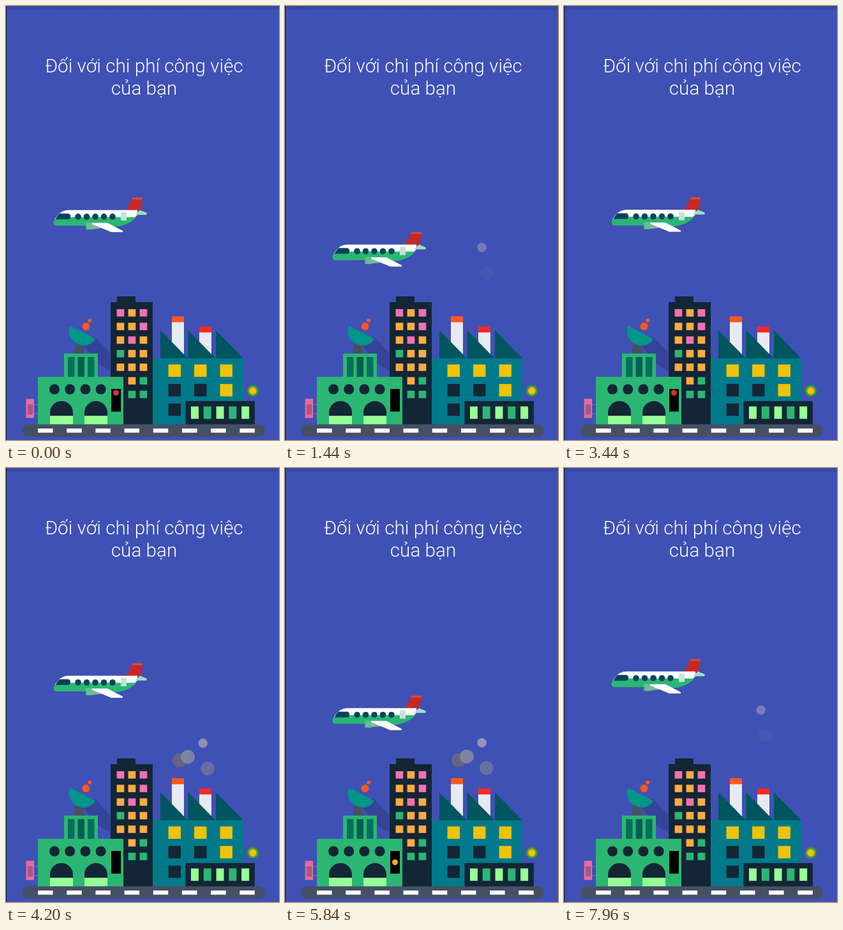
Recreate the animation shown at these times as an HTML page with a canvas. Size 428x680 px, loop 8 s.

```html
<!DOCTYPE html>
<html lang="vi">
<head>
<meta charset="utf-8">
<style>
html, body { margin: 0; width: 100%; height: 100%; overflow: hidden; background: #3f51b5; }
#stage { position: relative; width: 428px; height: 680px; overflow: hidden; }
canvas { position: absolute; left: 0; top: 0; display: block; }
h1 {
  position: absolute; left: 0; top: 76px; width: 433px; margin: 0;
  font: 300 29.7px/35px Roboto, sans-serif; color: #fff; text-align: center; white-space: nowrap;
}
</style>
</head>
<body>
<div id="stage">
  <canvas id="view" width="428" height="680"></canvas>
  <h1>Đối với chi phí công việc<br>của bạn</h1>
</div>
<script>
const LOOP = 8000, BOB = 4000, PUFF = 1632, SIGNAL = 3264;
const ctx = document.getElementById('view').getContext('2d');
const NAVY = '#132636', GREEN = '#2bb673', LIME = '#96ff96', PINK = '#f272b0',
      AMBER = '#ffab40', YELLOW = '#eec308', TEAL = '#007a8a', DEEP = '#00565f',
      ORANGE = '#ff5722', INK = '#00455c', ASPHALT = '#455064';

function rect(color, x, y, w, h) {
  ctx.fillStyle = color;
  ctx.fillRect(x, y, w, h);
}
function disc(color, x, y, r, alpha = 1) {
  if (alpha <= 0) return;
  ctx.globalAlpha = alpha;
  ctx.fillStyle = color;
  ctx.beginPath();
  ctx.arc(x, y, r, 0, Math.PI * 2);
  ctx.fill();
  ctx.globalAlpha = 1;
}
function shape(color, d) {
  ctx.fillStyle = color;
  ctx.fill(new Path2D(d));
}
function repeat(n, fn) {
  for (let i = 0; i < n; i++) fn(i);
}
// Fades in over a..b and out over c..d
function fade(t, a, b, c, d) {
  return Math.max(0, Math.min(1, (t - a) / (b - a), (d - t) / (d - c)));
}

function backdrop() {
  rect('#3f51b5', 0, 0, 428, 680);
  const g = ctx.createLinearGradient(0, 0, 0, 7);
  g.addColorStop(0, '#38479f');
  g.addColorStop(.6, '#3a4aa6');
  g.addColorStop(1, '#3f51b5');
  rect(g, 0, 0, 428, 7);
  rect('#0c1022', 0, 0, 1, 680);
}

function tower() {
  rect(NAVY, 174, 455, 29, 10);
  rect(NAVY, 164, 464, 66, 192);
  const tint = { p: PINK, o: AMBER, g: GREEN, '-': NAVY };
  ['pop', 'oop', 'opo', 'goo', 'ooo', '-og', '-gg'].forEach((row, r) =>
    repeat(3, i => rect(tint[row[i]], 173.6 + i * 18, 475 + r * 21.3, 11.7, 11.6)));
}

function factory() {
  repeat(2, i => {
    const x = 260 + i * 43, y = 486 + i * 16;
    rect('#e8eaf1', x, y, 19, 552 - y);
    rect(i ? '#f42a26' : ORANGE, x, y, 19, 9.5);
  });
  repeat(3, i => shape(DEEP, `M${242 + i * 43.5} 508l43 44h-43z`));
  rect(TEAL, 230, 552, 142, 104);
  repeat(3, r => repeat(r < 2 ? 3 : 1, c =>
    rect(r === 0 || c === 2 ? YELLOW : NAVY, 254.6 + c * 40.5, 561.6 + r * 30.6, 19.4, 19.4)));
  rect(NAVY, 281.5, 619, 108.5, 37);
  repeat(5, i => rect(i % 2 ? GREEN : LIME, 290 + i * 19.8, 627.4, 12, 19.4));
  rect(TEAL, 372, 602, 8, 2);
  disc('#1c8062', 387, 603, 10);
  disc('#5b983e', 387, 603, 8.3);
  disc(YELLOW, 387, 603, 5.7);
}

function dish() {
  shape('#354399', 'M138 517L163 543V571L144 560L122 533Z');
  shape(ASPHALT, 'M109 528H121L123 545H106Z');
  ctx.fillStyle = '#009688';
  ctx.beginPath();
  ctx.ellipse(120.3, 511.3, 22.3, 20, .48, 0, Math.PI);
  ctx.fill();
  disc(ORANGE, 125.5, 502, 6);
  disc(ORANGE, 131.3, 492.7, 3);
}

function hall() {
  rect(GREEN, 91, 544.5, 53, 38);
  repeat(3, i => rect(i === 1 ? '#025f52' : '#00705c', 97 + i * 15.5, 550, 10.5, 31.5));
  rect(GREEN, 50, 581, 134, 75);
  repeat(4, i => disc(NAVY, 76 + i * 24.2, 600.5, 8));
  repeat(2, i => {
    const x = 69 + i * 54;
    shape(NAVY, `M${x} 642v-5a18 18 0 0 1 36 0v5z`);
    rect(LIME, x, 642, 36, 13.5);
  });
  repeat(2, i => rect('#a3589c', 44, 624 + i * 14, 6, 1.2));
  rect('#e56c9e', 31.5, 615.5, 12.5, 30);
  rect('#a95685', 34, 624, 8, 16);
}

function road() {
  ctx.fillStyle = ASPHALT;
  ctx.beginPath();
  ctx.roundRect(25.5, 655.5, 380.5, 19.5, 9.7);
  ctx.fill();
  repeat(8, i => rect('#fff', 50 + i * 45.2, 662, 23.5, 6.5));
}

function signal(t) {
  rect('#000', 165, 600, 15, 35.5);
  const p = t % SIGNAL;
  // The red phase runs across the end of the cycle
  const q = p < 1000 ? p + SIGNAL : p;
  disc('#d32f2f', 172.5, 606, 4.5, fade(q, 2710, 3050, 3844, 4084));
  disc('#ffa733', 172.5, 617.8, 4.5, fade(p, 1810, 2150, 2590, 2740));
}

function plane(t) {
  const a = (t + 280) / BOB * Math.PI * 2;
  const lift = 27 - 29.7 * Math.cos(a) + .8 * Math.cos(3 * a - 2.88);
  ctx.save();
  ctx.translate(0, lift);
  shape('#c62828', 'M188 320L198 302H214L211 320Z');
  rect('#e64a2e', 198, 300, 16, 3);
  shape('#fff', 'M77 333C83 325 87 319.5 99 319.5H206V327L200 334H77Z');
  shape(GREEN, 'M77 333.5L97 330.5H202L206 327C201 337 188 344 172 345.5L160 344H79Q74 344 74.5 338Q75 335 77 333.5Z');
  shape(INK, 'M84 325H97Q101 325 101 329.5T97 334H78Q78 331 84 325Z');
  repeat(5, i => disc(INK, 113 + i * 13.5, 330, 4.8));
  rect('#c4e4d6', 180, 323, 9, 13);
  shape('#a5dcc0', 'M210 319.5L220.5 323.8V327H202Z');
  rect('#62c092', 125.5, 339, 10, 11);
  shape('#7fb89b', 'M135 341L152 347.5L135 349.5Z');
  shape('#fff', 'M135 339.5H159L183 352V354H165L135 341.5Z');
  ctx.restore();
}

function smoke(t) {
  // Phase 0.2..1.2, the puffs show in its second half
  const p = (t - 1440 + PUFF * 1.8) % PUFF / PUFF + .2;
  const d = p - .81, y = -d * (163 + 110 * d);
  const dark = fade(p, .56, .74, .85, .98);
  disc('#706c72', 272, 440.5 + y, 11, dark);
  disc('#94939c', 285, 434.8 + y, 10.8, dark);
  disc('#8c8b92', 316, 453 + y, 10.8, fade(p, .58, .8, .83, 1.02));
  disc('#fbd5bb', 308.7, 413.3 + y, 7.3, fade(p, .6, .8, .84, 1.07));
}

function draw(t) {
  backdrop();
  dish();
  tower();
  factory();
  hall();
  road();
  signal(t);
  smoke(t);
  plane(t);
}

let start;
function tick(now) {
  if (start === undefined) start = now;
  draw(Math.max(0, now - start) % LOOP);
  requestAnimationFrame(tick);
}
draw(0);
requestAnimationFrame(tick);
</script>
</body>
</html>
```
